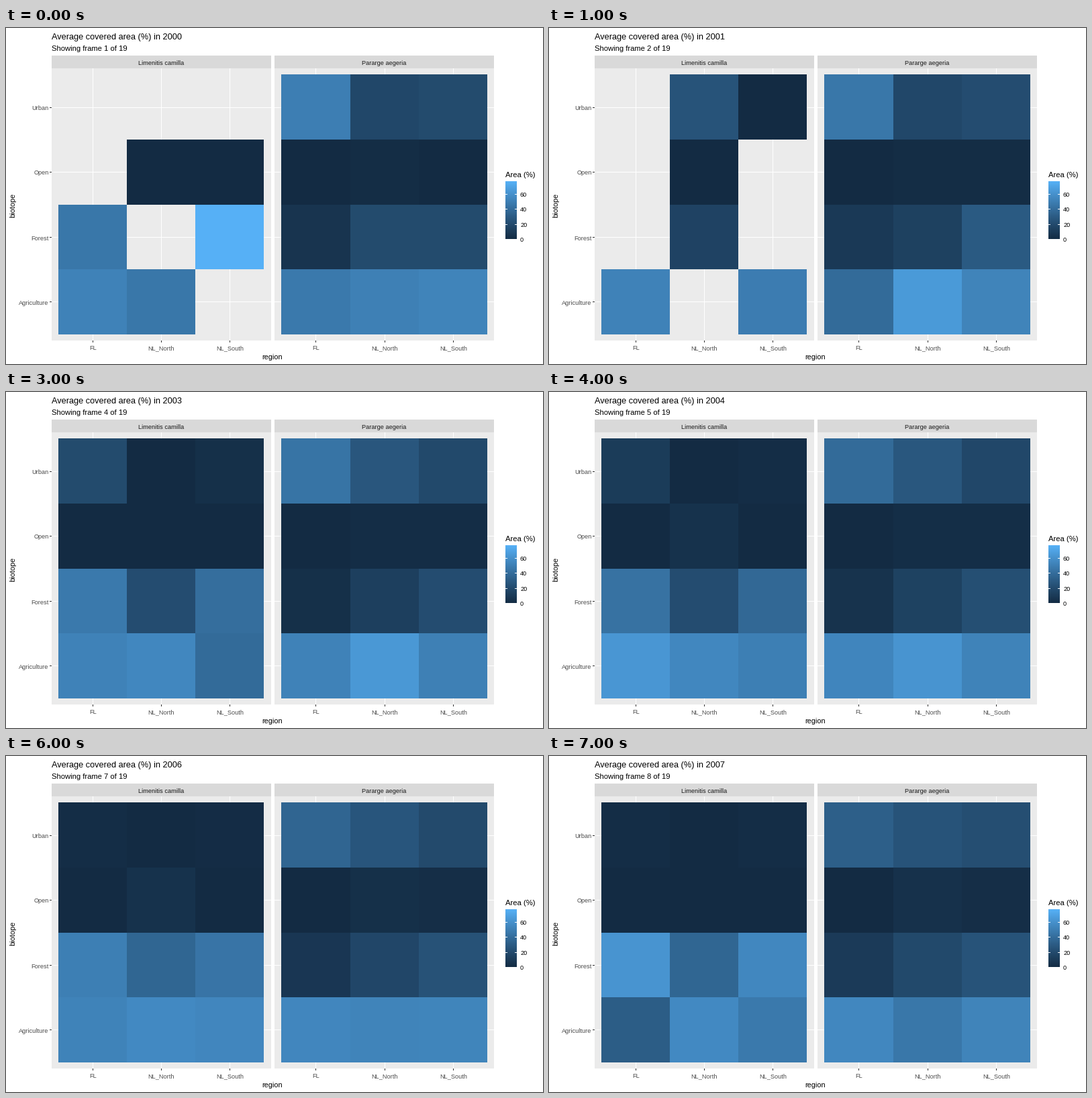
Animation of 800x500 px, one loop 8000 ms. Source, as a matplotlib script:

```python
import numpy as np
import matplotlib.pyplot as plt
from matplotlib.animation import FuncAnimation
from matplotlib.patches import Rectangle

W, H, DPI = 800, 500, 100
FIRST_YEAR, YEARS, TOTAL = 2000, 8, 19
TOP = 77.3
REGIONS = ["FL", "NL_North", "NL_South"]
BIOTOPES = ["Urban", "Open", "Forest", "Agriculture"]
SPECIES = ["Limenitis camilla", "Pararge aegeria"]
PANELS = [68, 400]
COLS = [[78, 180, 282, 384], [410, 513, 615, 717]]
ROWS = [69, 166, 263, 359, 456]
GRID_X = [[129, 231, 333], [461, 564, 666]]
GRID_Y = [118, 214, 311, 407]

# Rows are biotopes; three regions of the first species, then of the second.
_ = np.nan
AREA = {
    2000: [[_, _, _, 50, 18, 20], [_, 0, 0, 0, 1, 0],
           [46, _, 77, 6, 20, 20], [52, 46, _, 47, 51, 53]],
    2001: [[_, 25, 0, 46, 18, 21], [_, 0, _, 0, 1, 1],
           [_, 15, _, 9, 14, 29], [52, _, 49, 39, 65, 53]],
    2002: [[3, 1, 0, 37, 25, 20], [0, 0, 0, 0, 1.5, 0],
           [48, 12, 38, 3, 18, 18], [_, _, 5, 52, 55, 58]],
    2003: [[20, 0, 3, 44, 27, 19], [0, 0, 0, 0, 1.5, 1.5],
           [47, 21, 41, 3, 13, 21], [52, 55, 39, 52, 64, 51]],
    2005: [[1.5, 0, 0, 39, 28, 17], [0, 9, 0, 0, 2, 2],
           [39, _, 34, 5, 16, 24], [74, _, 62, 54, 60, 54]],
    2007: [[1.5, 0, 1.5, 32, 25, 22], [0, 0, 0, 0, 4, 2],
           [62, 36, 55, 10, 19, 25], [31, 56, 47, 55, 46, 53]],
}
AREA = {year: np.array(rows, float) for year, rows in AREA.items()}
for year in (2004, 2006):
    AREA[year] = np.nanmean([AREA[year - 1], AREA[year + 1]], axis=0)
AREA[2004][:, 3] = AREA[2005][:, 3]

# Colour ramp between two blues, straight in CIE Lab.
TO_XYZ = np.array([[0.4124, 0.3576, 0.1805],
                   [0.2126, 0.7152, 0.0722],
                   [0.0193, 0.1192, 0.9505]])
WHITE = TO_XYZ.sum(axis=1)
TO_LAB = np.array([[0, 116, 0], [500, -500, 0], [0, 200, -200]])


def to_lab(rgb):
    rgb = np.array(rgb) / 255
    linear = np.where(rgb > 0.04045, ((rgb + 0.055) / 1.055) ** 2.4, rgb / 12.92)
    t = TO_XYZ @ linear / WHITE
    f = np.where(t > 0.008856, np.cbrt(t), 7.787 * t + 16 / 116)
    return TO_LAB @ f - [16, 0, 0]


def to_rgb(lab):
    f = np.linalg.solve(TO_LAB, lab + np.array([16, 0, 0]))
    t = np.where(f > 0.2069, f ** 3, (f - 16 / 116) / 7.787)
    linear = np.clip(np.linalg.solve(TO_XYZ, t * WHITE), 0, 1)
    rgb = np.where(linear > 0.0031308,
                   1.055 * linear ** (1 / 2.4) - 0.055, 12.92 * linear)
    return np.clip(rgb, 0, 1)


LOW, HIGH = to_lab([19, 43, 67]), to_lab([86, 177, 247])


def shade(value):
    return to_rgb(LOW + (HIGH - LOW) * min(value / TOP, 1))


plt.rcParams["font.family"] = "Liberation Sans"
fig = plt.figure(figsize=(W / DPI, H / DPI), dpi=DPI, facecolor="white")
ax = fig.add_axes([0, 0, 1, 1])
ax.set_xlim(0, W)
ax.set_ylim(H, 0)
ax.axis("off")


def box(x0, y0, x1, y1, color, z=1):
    patch = Rectangle((x0, y0), x1 - x0, y1 - y0, facecolor=color,
                      edgecolor="none", antialiased=False, zorder=z)
    return ax.add_patch(patch)


def label(x, y, text, px, color="black", ha="left", **kw):
    kw.setdefault("va", "baseline")
    return ax.text(x, y, text, fontsize=px * 72 / DPI, color=color, ha=ha,
                   zorder=6, **kw)


tiles = []
for left, cols, grid, name in zip(PANELS, COLS, GRID_X, SPECIES):
    right = left + 327
    box(left, 41, right, 60, "#D9D9D9")
    box(left, 60, right, 465, "#EBEBEB")
    label((left + right) / 2, 55, name, 9.3, "#1A1A1A", "center")
    for y in GRID_Y:
        box(left, y, right, y + 1, "white", 2)
    for x, region in zip(grid, REGIONS):
        box(x, 60, x + 1, 465, "white", 2)
        box(x, 465, x + 1, 468, "#333333", 2)
        label(x + 0.3, 479, region, 9.1, "#4D4D4D", "center")
    tiles.append([[box(cols[c], ROWS[r], cols[c + 1], ROWS[r + 1], "white", 3)
                   for c in range(3)] for r in range(4)])
tiles = np.concatenate(tiles, axis=1)

for y, biotope in zip(GRID_Y, BIOTOPES):
    box(65, y, 68, y + 1, "#333333", 2)
    label(63.5, y + 4.5, biotope, 9.3, "#4D4D4D", "right")

label(397, 493, "region", 10.9, ha="center")
label(15, 263.5, "biotope", 10.9, ha="right", va="center", rotation=90,
      rotation_mode="default")

# Legend
label(744, 222, "Area (%)", 11.3)
for y in range(228, 314):
    box(744, y, 761, y + 1, shade(TOP * (313.5 - y) / 86))
for value in range(0, 61, 20):
    y = round(314 - value * 86 / TOP)
    box(744, y, 747, y + 1, "white", 4)
    box(758, y, 761, y + 1, "white", 4)
    label(766, y + 4.3, str(value), 9.2)

title = label(68, 17, "", 12.7)
subtitle = label(68, 34, "", 11.2)


def draw(i):
    year = FIRST_YEAR + i
    title.set_text(f"Average covered area (%) in {year}")
    subtitle.set_text(f"Showing frame {i + 1} of {TOTAL}")
    for tile, value in zip(tiles.flat, AREA[year].flat):
        known = not np.isnan(value)
        tile.set_visible(known)
        if known:
            tile.set_facecolor(shade(value))
    return [title, subtitle, *tiles.flat]


anim = FuncAnimation(fig, draw, frames=YEARS, interval=1000, repeat=True,
                     repeat_delay=0, blit=False)
plt.show()
```
